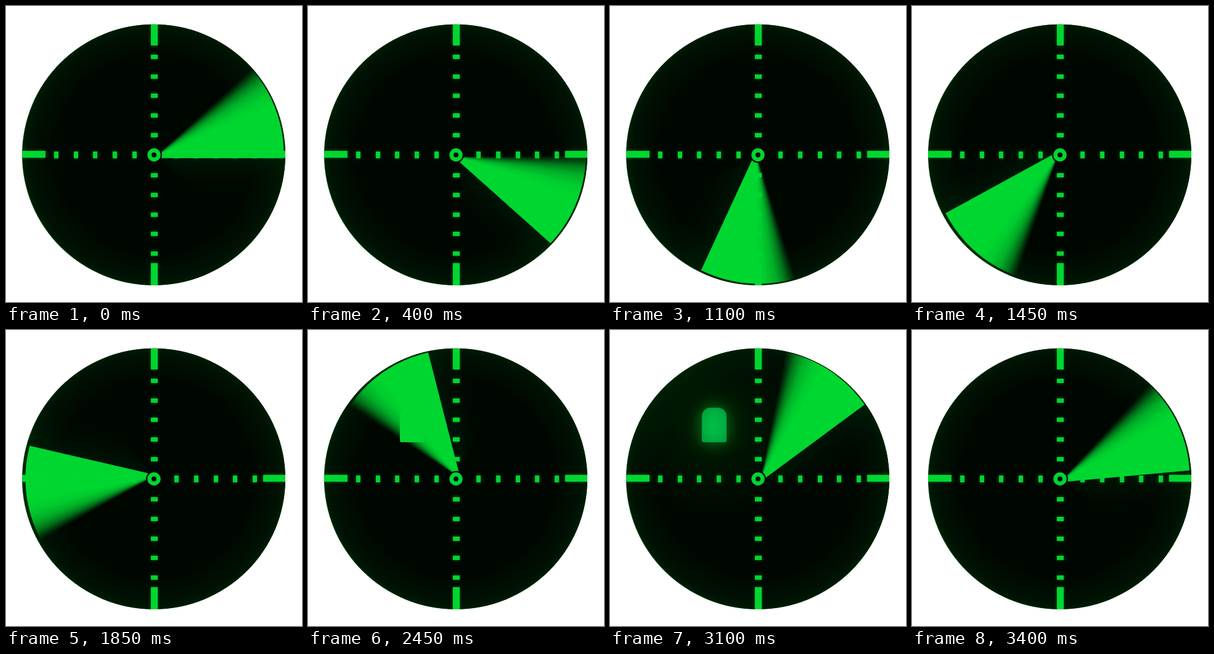
Recreate the animation shown at these times as an HTML page with a canvas. Size 480x480 px, loop 3450 ms.

```html
<!DOCTYPE html>
<html>
<head>
<meta charset="utf-8">
<style>
  html, body { margin: 0; width: 100%; height: 100%; overflow: hidden; background: #fff; }
  canvas { display: block; }
</style>
</head>
<body>
<canvas id="stage" width="480" height="480"></canvas>
<script>
const ctx = document.getElementById('stage').getContext('2d');
const LOOP = 3450, STEP = 50;
const GREEN = '#00d630', DARK = '#000701';
const rad = deg => deg * Math.PI / 180;
const ramp = (t, from, to) => Math.min(1, Math.max(0, (t - from) / (to - from)));
const mix = (a, b, k) => Math.round(a + (b - a) * k);

function disc(x, y, rx, color, ry = rx) {
  ctx.fillStyle = color;
  ctx.beginPath();
  ctx.ellipse(x, y, rx, ry, 0, 0, 2 * Math.PI);
  ctx.fill();
}

function gradient(base, stops) {
  stops.forEach(([at, color]) => base.addColorStop(at, color));
  return base;
}

// Soft trailing edge, hard leading edge.
const beam = gradient(ctx.createConicGradient(rad(-42.5), 2, 3),
  [[0, 0], [2, .18], [5, .5], [9, .78], [14, .94], [19, 1], [80, 1], [80, 0], [360, 0]]
    .map(([deg, alpha]) => [deg / 360, `rgba(0,214,48,${alpha})`]));

const screen = gradient(ctx.createRadialGradient(241, 240.5, 0, 240, 241, 213),
  [[0, DARK], [.75, DARK], [.95, '#001203'], [1, '#001c04']]);

const haze = gradient(ctx.createRadialGradient(169, 154, 20, 169, 154, 150),
  [[0, 'rgba(0,130,10,.4)'], [.35, 'rgba(0,130,10,.2)'], [1, 'rgba(0,130,10,0)']]);

function drawSweep(angle) {
  const radius = 209.5;
  ctx.save();
  ctx.translate(241, 240.8);
  ctx.rotate(angle);
  ctx.beginPath();
  ctx.moveTo(0, 6);
  ctx.arc(0, 0, radius, Math.asin(6 / radius), rad(-60), true);
  ctx.closePath();
  ctx.shadowColor = 'rgba(0,214,48,.13)';
  ctx.shadowBlur = 60;
  ctx.fillStyle = beam;
  ctx.fill();
  ctx.restore();
}

function drawScale() {
  ctx.save();
  ctx.shadowColor = 'rgba(0,214,48,.5)';
  ctx.shadowBlur = 4;
  ctx.fillStyle = GREEN;
  ctx.fillRect(26, 235, 38, 11);
  ctx.fillRect(417, 235, 36, 11);
  ctx.fillRect(235, 30, 11, 34);
  ctx.fillRect(235, 417, 11, 36);
  for (let i = 0; i < 5; i++) {
    for (const start of [81.3, 276.6]) {
      const p = start + i * 31.7;
      ctx.fillRect(Math.round(p - 3.5), 236, 7, 11);
      ctx.fillRect(235, Math.round(p - 3.5) + (start < 240 ? 1 : -2), 11, 7);
    }
  }
  ctx.restore();
}

function drawBlip(t) {
  const heat = ramp(t, 2450, 2700);
  ctx.save();
  ctx.globalAlpha = ramp(t, 2200, 2400) * (1 - ramp(t, 2900, 3300));
  ctx.fillStyle = `rgb(0,${mix(214, 255, heat)},${mix(48, 110, heat)})`;
  ctx.shadowColor = `rgba(0,230,60,${heat})`;
  ctx.shadowBlur = 24 * heat;
  ctx.beginPath();
  ctx.roundRect(149, 126, 40, 56, [14, 14, 3, 3]);
  ctx.fill();
  ctx.restore();
}

function drawHaze(t) {
  ctx.save();
  ctx.globalAlpha = ramp(t, 2450, 2700) * (1 - ramp(t, 2900, 3300));
  ctx.fillStyle = haze;
  ctx.fillRect(0, 0, 480, 480);
  ctx.restore();
}

function draw(now) {
  const t = Math.floor(now / STEP) * STEP % LOOP;
  ctx.clearRect(0, 0, 480, 480);
  ctx.save();
  disc(239.5, 241.4, 213.5, '#005a14', 211.6);
  ctx.clip();
  disc(240.2, 241, 213.5, screen, 211.8);
  drawHaze(t);
  drawSweep(2 * Math.PI * t / LOOP);
  drawScale();
  ctx.restore();
  drawBlip(t);
  disc(240, 241.5, 13, DARK);
  disc(240, 241.5, 10.7, GREEN);
  disc(240, 241.5, 4, DARK);
}

const begin = performance.now();
function tick() {
  draw(performance.now() - begin);
  requestAnimationFrame(tick);
}
tick();
</script>
</body>
</html>
```
